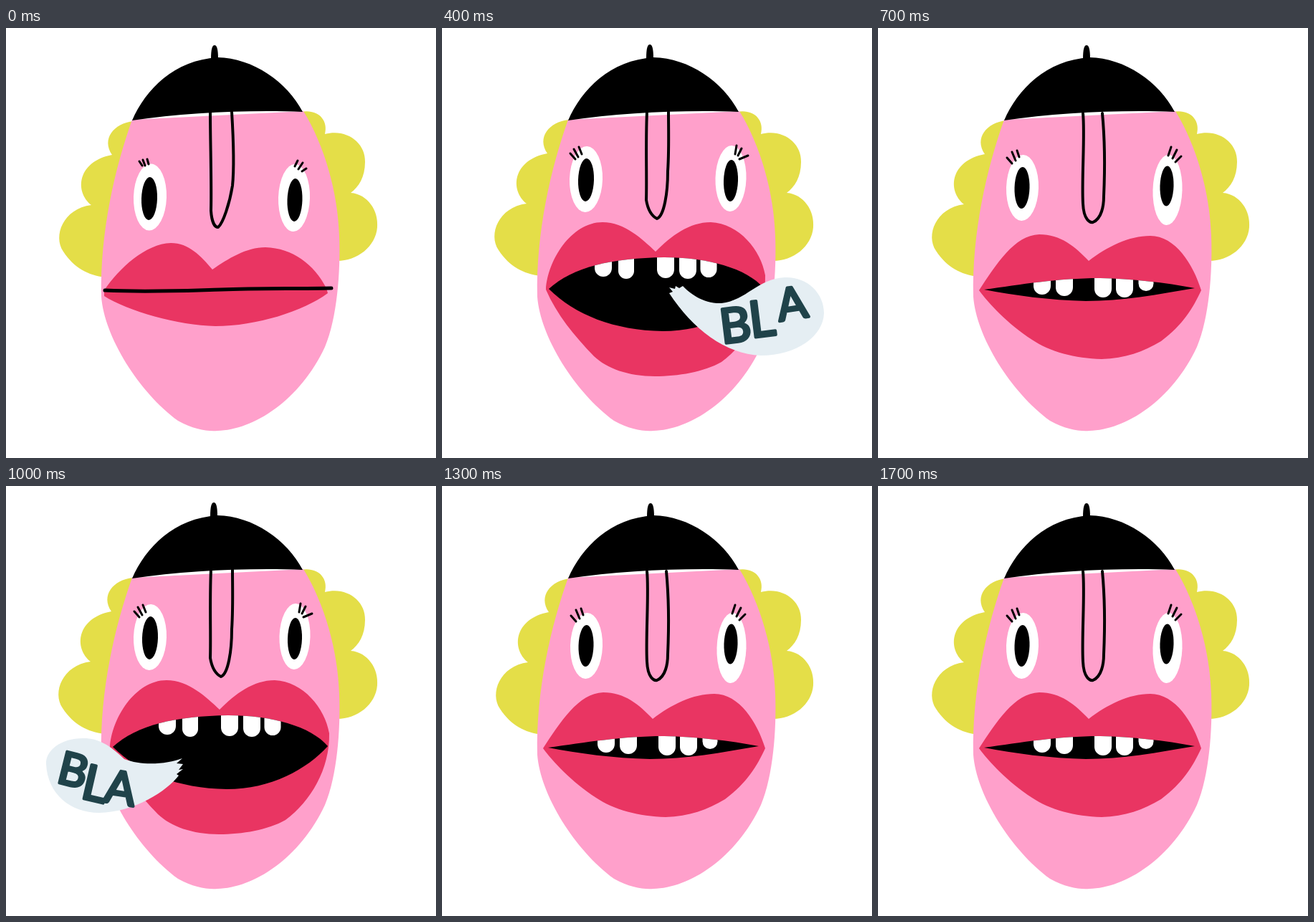
Recreate the animation shown at these times as an HTML page with a canvas. Size 600 by 600 pixels, loop 1800 ms.

```html
<!DOCTYPE html>
<html>
<head>
<meta charset="utf-8">
<style>
html, body { margin: 0; width: 100%; height: 100%; overflow: hidden; background: #fff; }
canvas { display: block; }
</style>
</head>
<body>
<canvas id="stage" width="600" height="600"></canvas>
<script>
const ctx = document.getElementById('stage').getContext('2d');
const PINK = '#ffa0cb', HAIR = '#e4de48', LIP = '#e93562', BUBBLE = '#e5eef3', INK = '#20434a';
const STEP = 100, STEPS = 18;

const HEAD = 'M176 128 C152 195 131 285 133 375 C137 430 185 508 240 548 C262 560 280 563 295 562 C345 561 410 520 445 445 C462 405 467 340 465 290 C463 230 445 165 415 116 Z';
const HAT = 'M176 129 C195 85 235 45 295 41 C345 42 392 75 414 117 C340 114 250 118 176 129 Z';
const STEM = 'M286 46 C286 38 286 24 291 24 C296 24 296 38 296 46 Z';
const HAIR_LEFT = 'M178 130 C150 133 133 155 148 177 C100 186 95 228 119 247 C80 252 65 290 80 312 C95 335 115 345 138 348 L180 240 Z';
const HAIR_RIGHT = 'M412 117 C435 113 450 128 445 148 C475 140 502 160 501 187 C501 208 492 222 481 230 C505 232 520 255 518 278 C516 305 490 325 462 325 L420 220 Z';

const OPEN_MOUTH = 'M149 364 C183 333 238 321 310 320 C370 320 425 335 449 363 C420 395 370 423 308 423 C240 422 185 400 149 364 Z';
const openLips = top => `M145 365 C147 325 180 ${top} 224 ${top} C255 ${top} 280 295 298 312 C320 290 345 ${top} 375 ${top} C415 ${top + 2} 445 310 451 345 C452 395 425 440 390 466 C365 480 330 486 297 486 C260 486 230 475 212 458 C185 430 160 400 145 365 Z`;

// eyes: x, y, rx, ry; lashes: x1, y1, x2, y2; teeth: centre, half width, bottom
const closed = {
  hair: [0, 0], stem: 0,
  whites: [[201, 236, 23, 46.5], [402, 237, 22, 47]],
  pupils: [[200, 238, 11, 30], [403, 240, 10.5, 30]],
  lashes: 'M186 186 L190 192 M191 184 L194 192 M197 183 L199 190 M403 193 L407 185 M408 197 L414 188 M413 200 L419 196',
  nose: 'M285 117 C285 160 287 215 286 255 C287 270 291 278 296 278 C303 272 312 245 316 220 C319 190 317 150 315 117',
  lips: 'M137 366 C158 335 195 301 230 300 C255 300 272 318 288 337 C310 322 335 306 362 306 C400 307 430 330 447 363 L449 370 C415 395 350 416 292 416 C240 415 170 395 137 374 Z',
  line: 'M138 366 C200 369 260 366 300 365 C350 363 400 364 454 363'
};
const half = {
  hair: [1, -1], stem: 0,
  whites: [[201.5, 223, 22.5, 46], [404, 226, 20.5, 49]],
  pupils: [[201, 223, 10.5, 29], [403, 220.5, 9.5, 28]],
  lashes: 'M180 181 L187 189 M187 173 L192 185 M194 171 L197 180 M409 166 L405 178 M417 170 L411 182 M423 179 L415 187',
  nose: 'M286 119 C289 150 284 210 286 245 C287 268 296 272 300 271 C312 266 315 248 315 235 C317 190 316 150 313 119',
  lips: 'M141 366 C165 330 190 289 225 288 C255 288 275 305 294 325 C320 305 350 290 380 290 C415 290 440 330 451 366 C440 390 425 415 395 437 C370 452 345 461 312 462 C275 461 240 452 215 435 C180 412 155 385 141 366 Z',
  mouth: 'M148 365 C200 358 250 349 310 349 C355 350 400 355 442 363 C390 372 340 381 290 381 C240 380 190 373 148 365 Z',
  teeth: [[229, 12, 372], [260, 12, 374], [314, 12, 376], [344, 12, 376], [374, 10.5, 367]]
};
const open = {
  hair: [-2, -2], stem: -1,
  whites: [[202, 211, 22.5, 46], [403, 210, 22, 46]],
  pupils: [[202, 212, 10.5, 30], [404, 212, 10.5, 30]],
  lashes: 'M179 175 L186 184 M183 170 L189 180 M191 166 L194 177 M412 163 L410 176 M419 168 L413 179 M426 177 L416 182',
  nose: 'M286 117 C286 150 284 200 285 245 C288 255 297 262 303 267 C308 258 314 225 315 200 C318 170 317 140 317 117',
  lips: openLips(274), mouth: OPEN_MOUTH,
  teeth: [[226, 12, 349], [256, 11.5, 350], [312, 13, 350], [341, 12.5, 351], [371, 12.5, 346]]
};
const settle = {
  hair: [-1, -2], stem: -1,
  whites: [[201, 211, 23, 46], [403, 210, 21.5, 46]],
  pupils: [[201, 212, 11, 30], [403, 213, 10, 29]],
  lashes: 'M179 175 L186 183 M184 169 L190 180 M191 166 L195 176 M411 164 L409 176 M418 168 L413 178 M427 178 L415 183',
  nose: 'M286 117 C284 160 286 210 285 240 C287 252 292 262 300 266 C310 262 315 230 315 200 C317 170 316 140 316 117',
  lips: openLips(271), mouth: OPEN_MOUTH,
  teeth: [[225, 12, 347], [257, 11, 350], [312, 12, 349], [343, 12, 350], [372, 11.5, 348]]
};
const wide = { ...settle, nose: open.nose, jaw: 1.02 };
const cycle = [closed, half, open, wide, settle, half];

// letters: glyph, centre x, centre y, size, tilt in degrees
const bubbles = [
  {
    path: 'M317 370 L322 368 L317 362 L325 364 L326 360 L331 363 L336 360 C345 370 365 385 390 384 C425 380 440 350 478 348 C510 347 533 370 533 398 C532 430 495 457 445 457 C395 455 350 420 317 370 Z',
    letters: [['B', 409, 414, 67, -7], ['L', 446, 405, 70, -7], ['A', 488, 384, 62, -9]]
  },
  {
    path: 'M246 380 C225 388 190 391 165 381 C145 362 130 352 108 352 C75 352 55 370 56 388 C58 430 90 456 130 456 C180 455 225 425 241 404 L238 402 L247 395 L241 396 L247 388 L238 387 Z',
    letters: [['B', 94, 396, 63, 14], ['L', 125, 415, 68, 13], ['A', 160, 421, 64, 9]]
  }
];

function fill(path, color) {
  ctx.fillStyle = color;
  ctx.fill(new Path2D(path));
}

function stroke(path, width) {
  ctx.strokeStyle = '#000';
  ctx.lineWidth = width;
  ctx.stroke(new Path2D(path));
}

function oval([x, y, rx, ry], color) {
  ctx.fillStyle = color;
  ctx.beginPath();
  ctx.ellipse(x, y, rx, ry, 0.03, 0, Math.PI * 2);
  ctx.fill();
}

function moved(x, y, draw) {
  ctx.save();
  ctx.translate(x, y);
  draw();
  ctx.restore();
}

function drawMouth(pose) {
  ctx.save();
  if (pose.jaw) {
    ctx.translate(0, 365 * (1 - pose.jaw));
    ctx.scale(1, pose.jaw);
  }
  fill(pose.lips, LIP);
  if (pose.line) stroke(pose.line, 5);
  if (pose.mouth) {
    fill(pose.mouth, '#000');
    ctx.clip(new Path2D(pose.mouth));
    ctx.fillStyle = '#fff';
    for (const [x, r, bottom] of pose.teeth) {
      ctx.beginPath();
      ctx.roundRect(x - r, bottom - 60, r * 2, 60, [0, 0, r, r]);
      ctx.fill();
    }
  }
  ctx.restore();
}

function drawBubble({ path, letters }) {
  fill(path, BUBBLE);
  ctx.fillStyle = ctx.strokeStyle = INK;
  ctx.lineWidth = 4;
  ctx.textAlign = 'center';
  for (const [glyph, x, y, size, tilt] of letters) {
    moved(x, y, () => {
      ctx.rotate(tilt * Math.PI / 180);
      ctx.font = `${size}px Lato, sans-serif`;
      ctx.fillText(glyph, 0, size * 0.36);
      ctx.strokeText(glyph, 0, size * 0.36);
    });
  }
}

function drawFace(pose) {
  moved(...pose.hair, () => fill(HAIR_LEFT, HAIR));
  fill(HAIR_RIGHT, HAIR);
  fill(HEAD, PINK);
  stroke(pose.nose, 4);
  fill(HAT, '#000');
  moved(pose.stem, pose.stem, () => fill(STEM, '#000'));
  pose.whites.forEach(eye => oval(eye, '#fff'));
  pose.pupils.forEach(eye => oval(eye, '#000'));
  stroke(pose.lashes, 3);
  drawMouth(pose);
}

function render(now) {
  const step = Math.floor(now / STEP) % STEPS;
  const phase = step % cycle.length;
  const bubble = bubbles[Math.floor(step / cycle.length)];
  ctx.fillStyle = '#fff';
  ctx.fillRect(0, 0, 600, 600);
  ctx.lineCap = ctx.lineJoin = 'round';
  drawFace(cycle[phase]);
  if (bubble && phase >= 2 && phase <= 4) drawBubble(bubble);
}

let start;
function tick(now) {
  start ??= now;
  render(now - start);
  requestAnimationFrame(tick);
}
render(0);
requestAnimationFrame(tick);
</script>
</body>
</html>
```
